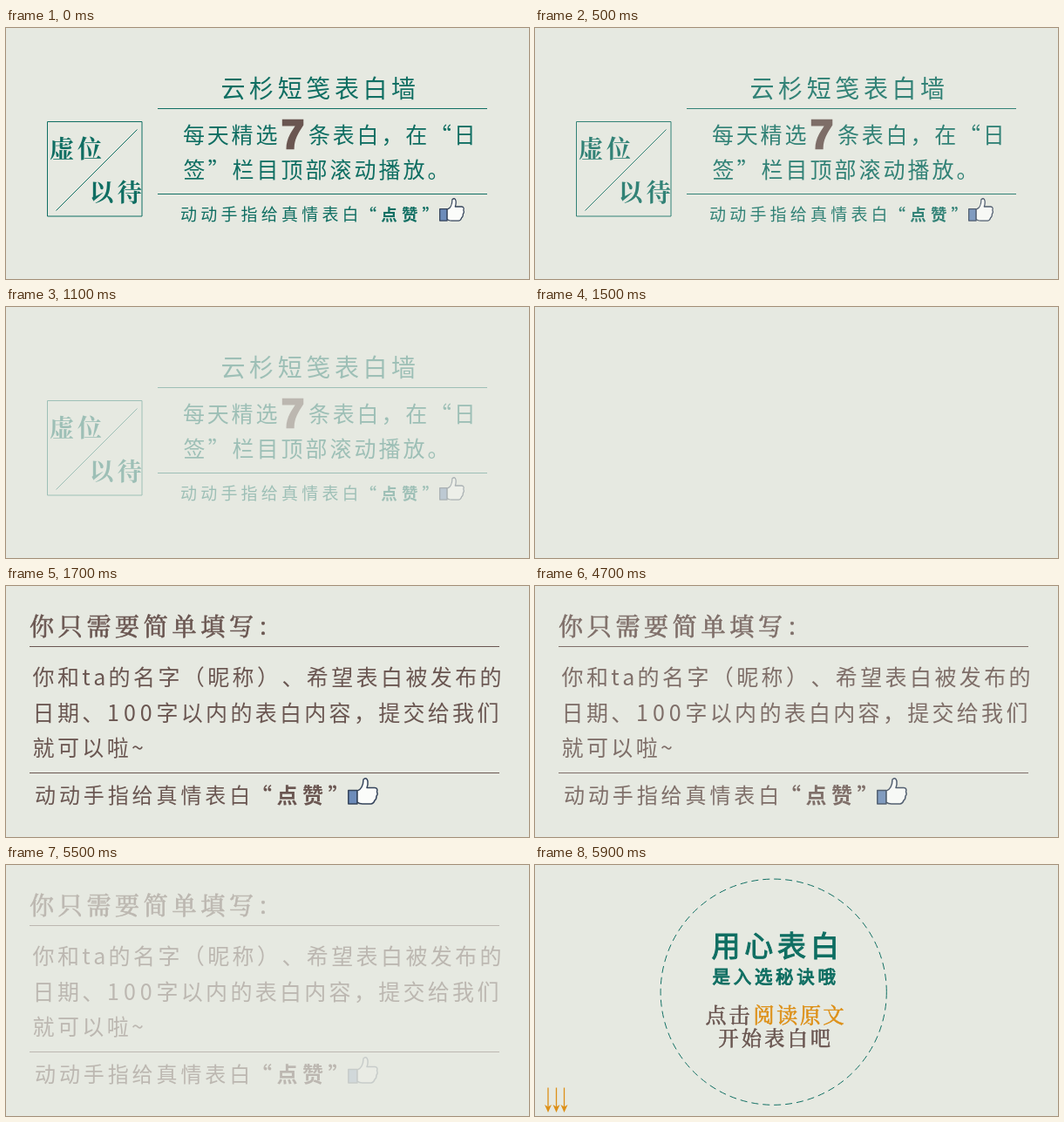
An HTML page for the animation above (8 s loop, 600 by 288 pixels).

```html
<!DOCTYPE html>
<html lang="zh-CN">
<head>
<meta charset="utf-8">
<style>
  html, body { margin: 0; width: 100%; height: 100%; overflow: hidden; background: #e6e9e1; }
  svg { display: block; width: 100%; height: 100%; }
  text {
    font-family: "Noto Sans CJK SC", "Noto Sans CJK", sans-serif;
    font-weight: 300; font-kerning: none; text-spacing-trim: space-all; white-space: pre;
    fill: currentColor;
  }
  .serif, .song { font-family: "Noto Serif CJK SC", "Noto Serif SC", "Noto Sans CJK SC", "Noto Sans CJK", serif; }
  .serif { font-weight: 600; }
  .song, .medium { font-weight: 400; stroke: currentColor; stroke-width: .7; }
  .medium { stroke-width: 1; }
  .bold { font-weight: 700; }
  .seven { font: 700 47px "Liberation Sans", sans-serif; stroke: currentColor; stroke-width: 2.4; }
  .rule { fill: none; stroke: currentColor; }
  .teal { color: #0f6e62; }
  .brown { color: #6a5651; }
  .orange { color: #dd9018; }
</style>
</head>
<body>
<svg viewBox="0 0 600 288" xmlns="http://www.w3.org/2000/svg">
  <defs>
    <g id="thumb" stroke="#34435a" stroke-width="1.5" stroke-linejoin="round">
      <path d="M.8 14.5H11V30H.8Z" fill="#6d8cba"/>
      <path d="M11 15C15 14 18 9 18 2Q22-1 23 4Q23.5 8 22 11.5H31Q35 12 33.5 16Q35 19 33 21Q33 25 31 26Q30 29.5 27 30H17Q13 30 11 28Z" fill="#fbfcfa"/>
    </g>
  </defs>
  <rect width="600" height="288" fill="#e6e9e1"/>

  <g id="invite" class="teal">
    <path class="rule" d="M174 92.5H552M174 190.5H552M47.5 107.5H156V216H47.5ZM57.5 209.5L150.5 116.5"/>
    <text class="seven brown" x="316" y="137.5">7</text>
    <use href="#thumb" transform="translate(497 195) scale(.83 .87)"/>
  </g>

  <g id="form" class="brown">
    <path class="rule" d="M27 69.5H566M27 214.5H566"/>
    <use id="formThumb" href="#thumb" x="392" y="220"/>
  </g>

  <g id="finale" class="teal">
    <circle class="rule" cx="273.7" cy="145.7" r="129.6" stroke-dasharray="8 5"/>
    <g id="arrows" class="orange"></g>
  </g>
</svg>
<script>
const SVG = "http://www.w3.org/2000/svg";
const byId = id => document.getElementById(id);

function add(parent, tag, attributes) {
  const node = document.createElementNS(SVG, tag);
  for (const key in attributes) node.setAttribute(key, attributes[key]);
  return parent.appendChild(node);
}

// Places a line by its left edge and the vertical centre of its glyphs.
function write(scene, x, middle, size, pitch, content, style = "") {
  const node = add(byId(scene), "text", {
    x, y: middle + size * 0.38, "font-size": size, "letter-spacing": pitch - size, class: style
  });
  node.textContent = content;
}

write("invite", 246.5, 69, 28, 32.6, "云杉短笺表白墙");
write("invite", 203, 122.5, 25, 27.8, "每天精选");
write("invite", 347, 122.5, 25, 27.8, "条表白，在“日");
write("invite", 203.5, 162, 25, 28, "签”栏目顶部滚动播放。");
write("invite", 200, 213.5, 19, 23.2, "动动手指给真情表白");
write("invite", 406.5, 213.5, 18.5, 23.7, "“点赞”", "bold");
write("invite", 50, 138.5, 28, 32, "虚位", "serif");
write("invite", 95.5, 188, 28, 32.3, "以待", "serif");

write("form", 27, 46, 28, 32.7, "你只需要简单填写：", "song");
write("form", 30.5, 104, 25, 28.4, "你和ta的名字（昵称）、希望表白被发布的");
write("form", 30.5, 145, 25, 28.4, "日期、");
write("form", 116, 145, 25, 30, "100");
write("form", 172.5, 145, 25, 28.3, "字以内的表白内容，提交给我们");
write("form", 30.5, 185.5, 25, 28.4, "就可以啦~");
write("form", 33, 240, 24, 27.9, "动动手指给真情表白");
write("form", 281, 240, 24, 29.5, "“点赞”", "bold");

write("finale", 202.5, 92.5, 33, 37.8, "用心表白", "medium");
write("finale", 203.5, 128.3, 20.5, 24.2, "是入选秘诀哦", "medium");
write("finale", 195.5, 172, 24, 27, "点击", "song brown");
write("finale", 250.5, 172, 24, 26.7, "阅读原文", "song orange");
write("finale", 210.5, 198, 23, 26.4, "开始表白吧", "song brown");

for (const x of [15, 24.5, 33.5]) {
  add(byId("arrows"), "path", { d: `M${x} 255.5V278`, class: "rule", "stroke-width": 1.3 });
  add(byId("arrows"), "path", { d: `M${x - 4} 275L${x} 277.5L${x + 4} 275L${x} 284Z`, fill: "currentColor" });
}

// Opacity drops by a sixth every 200 ms once the fade begins.
const fade = (time, start) =>
  time < start ? 1 : Math.max(0, 1 - (Math.floor((time - start) / 200) + 1) / 6);

function draw(now) {
  const time = now % 8000;
  const textHeld = time >= 5500 && time < 5700;
  byId("invite").style.opacity = fade(time, 500);
  byId("form").style.opacity = time < 1700 ? 0 : textHeld ? 1 / 3 : fade(time, 4700);
  byId("formThumb").style.opacity = textHeld ? 0.5 : 1;
  byId("finale").style.opacity = time < 5900 ? 0 : 1;
}

const start = performance.now();
function tick() {
  draw(performance.now() - start);
  requestAnimationFrame(tick);
}
tick();
</script>
</body>
</html>
```
